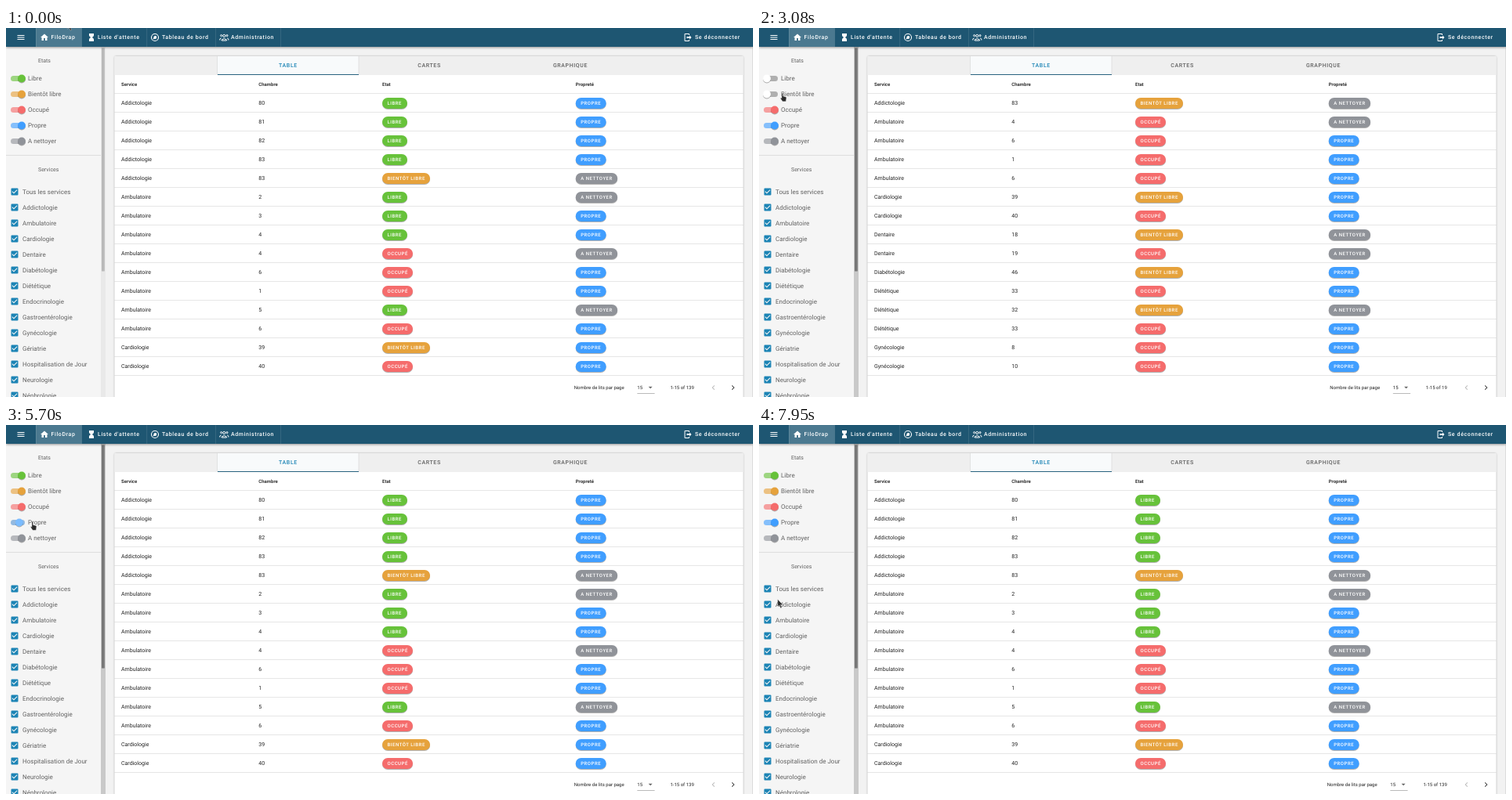
Animation of 953x471 px, one loop 8 s. Source, as an HTML page:

```html
<!DOCTYPE html>
<html lang="fr">
<head>
<meta charset="utf-8">
<title>Lits</title>
<style>
html, body { margin: 0; width: 100%; height: 100%; overflow: hidden; background: #f2f2f2; }
svg { display: block; width: 953px; height: 471px; font-family: Roboto, Arial, sans-serif; text-rendering: geometricPrecision; }
.nav, .tab { font-weight: 500; letter-spacing: .0893em; }
.pill { font-weight: 500; letter-spacing: .0893em; fill: #fff; }
.raised { filter: drop-shadow(0 1px .6px rgba(0,0,0,.3)); }
.card { filter: drop-shadow(0 .8px 1px rgba(0,0,0,.3)); }
</style>
</head>
<body>
<svg viewBox="0 0 953 471" xmlns="http://www.w3.org/2000/svg"></svg>
<script>
const LOOP = 8000;
const BAR = '#1e5672', BLUE = '#1c84b5', INK = 'rgba(0,0,0,.87)', SOFT = 'rgba(0,0,0,.6)';
const COLORS = { L: '#67c23a', B: '#e6a23c', O: '#f56c6c', P: '#409eff', N: '#909399' };
const PILLS = { L: ['LIBRE', 32], B: ['BIENTÔT LIBRE', 61], O: ['OCCUPÉ', 39], P: ['PROPRE', 39], N: ['A NETTOYER', 53.5] };

// room, state and cleanliness of each bed, by department
const BEDS = Object.entries({
  Addictologie: '80LP 81LP 82LP 83LP 83BN',
  Ambulatoire: '2LN 3LP 4LP 4ON 6OP 1OP 5LN 6OP',
  Cardiologie: '39BP 40OP',
  Dentaire: '18BN 19ON',
  Diabétologie: '43LN 46BP',
  Diététique: '33OP 32BN 33OP',
  Gynécologie: '8OP 10OP 7OP',
  Orthopédie: '20BN 22LN 22BN 23LN'
}).flatMap(([service, beds]) => beds.split(' ').map(bed =>
  ({ service, room: parseInt(bed), state: bed.at(-2), clean: bed.at(-1) })));

const SERVICES = ['Tous les services', 'Addictologie', 'Ambulatoire', 'Cardiologie', 'Dentaire', 'Diabétologie',
  'Diététique', 'Endocrinologie', 'Gastroentérologie', 'Gynécologie', 'Gériatrie', 'Hospitalisation de Jour',
  'Neurologie', 'Néphrologie'];

const WIDE = [147, 322.3, 480, 726.7], NARROW = [147, 337.3, 510.8, 704.5];
const VIEWS = [
  { at: 0, hidden: '', total: 139, cols: WIDE },
  { at: 2250, hidden: 'L', total: 19, cols: WIDE },
  { at: 3200, hidden: 'LB', total: 11, cols: NARROW },
  { at: 4280, hidden: 'L', total: 19, cols: WIDE },
  { at: 4750, hidden: '', total: 139, cols: WIDE },
  { at: 5800, hidden: 'P', total: 12, cols: WIDE },
  { at: 7150, hidden: '', total: 139, cols: WIDE }
];

const SWITCHES = [
  { key: 'L', label: 'Libre', flips: [1780, 4450] },
  { key: 'B', label: 'Bientôt libre', flips: [2850, 3780] },
  { key: 'O', label: 'Occupé', flips: [] },
  { key: 'P', label: 'Propre', flips: [5700, 6800] },
  { key: 'N', label: 'A nettoyer', flips: [] }
];

// start, end, x, y, hand shape
const MOVES = [
  [0, 0, 78, -8, false], [130, 130, 74, 2, false], [500, 700, 52, 55, false],
  [1200, 1200, 29, 64, true], [1780, 2030, 30, 76, false], [2250, 2550, 27.5, 83, true],
  [3780, 4150, 33.5, 58, true], [4750, 5150, 31.5, 123.5, true], [7630, 7950, 23.5, 222.5, false]
];

const ICONS = {
  menu: 'M3 6H21V8H3ZM3 11H21V13H3ZM3 16H21V18H3Z',
  home: 'M10 20V14H14V20H19V12H22L12 3L2 12H5V20Z',
  sand: 'M6 2V8L10 12L6 16V22H18V16L14 12L18 8V2Z',
  exit: 'M16 17V14H9V10H16V7L21 12ZM14 2A2 2 0 0 1 16 4V6H14V4H5V20H14V18H16V20A2 2 0 0 1 14 22H5A2 2 0 0 1 3 20V4A2 2 0 0 1 5 2Z',
  check: 'M10 17L5 12L6.4 10.6L10 14.2L17.6 6.6L19 8ZM19 3H5A2 2 0 0 0 3 5V19A2 2 0 0 0 5 21H19A2 2 0 0 0 21 19V5A2 2 0 0 0 19 3Z',
  next: 'M8.6 16.6L13.2 12L8.6 7.4L10 6L16 12L10 18Z',
  prev: 'M15.4 16.6L10.8 12L15.4 7.4L14 6L8 12L14 18Z'
};

const clamp = v => Math.max(0, Math.min(1, v));
const ease = v => { v = clamp(v); return v * v * (3 - 2 * v); };
const lerp = (a, b, p) => a + (b - a) * p;
const last = (list, test) => list.filter(test).at(-1);
const text = (x, y, s, size, fill = INK, extra = '') =>
  `<text x="${x}" y="${y + size * .342}" font-size="${size}" fill="${fill}" ${extra}>${s}</text>`;
const rect = (x, y, w, h, fill, extra = '') =>
  `<rect x="${x}" y="${y}" width="${w}" height="${h}" fill="${fill}" ${extra}/>`;
const icon = (name, x, y, fill, extra = '') =>
  `<path d="${ICONS[name]}" transform="translate(${x - 6} ${y - 6}) scale(.5)" fill="${fill}" ${extra}/>`;

function pill(key, x, y) {
  const [label, width] = PILLS[key];
  return rect(x, y - 7, width, 14, COLORS[key], 'rx="7" class="raised"') + text(x + 6.5, y, label, 6, '#fff', 'class="pill"');
}

function header() {
  const nav = (x, s) => text(x, 12, s, 7, '#fff', 'class="nav"');
  const person = (x, y, r) => `<circle cx="${x}" cy="${y}" r="${r}"/>`;
  return rect(0, 0, 953, 24, BAR, 'style="filter:drop-shadow(0 1px 1.5px rgba(0,0,0,.4))"')
    + rect(38, 0, 58.5, 24, '#4b7990')
    + [38, 96, 179.5, 267, 350].map(x => rect(x, 0, .6, 24, 'rgba(255,255,255,.18)')).join('')
    + icon('menu', 19, 12, '#fff') + icon('home', 49, 12, '#fff') + icon('sand', 109, 12, '#fff')
    + '<g fill="none" stroke="#fff"><circle cx="190" cy="12" r="4.5" stroke-width="1.1"/>'
    + '<path d="M188 14L191.5 10.5" stroke-width="1.2"/></g><circle cx="190.3" cy="12" r="1.9" fill="#fff"/>'
    + `<g fill="none" stroke="#fff" stroke-width="1">${person(278.3, 10, 1.6)}${person(274.6, 9.6, 1)}${person(282, 9.6, 1)}`
    + '<path d="M275.2 16V15Q278.3 12.2 281.4 15V16ZM272.8 15.5V14L274.5 12.8M283.8 15.5V14L282.1 12.8"/></g>'
    + icon('exit', 870, 12, '#fff')
    + nav(57.5, 'FiloDrap') + nav(117, 'Liste d\'attente') + nav(199, 'Tableau de bord')
    + nav(287, 'Administration') + nav(879, 'Se déconnecter');
}

function sidebar() {
  const toggles = SWITCHES.map(({ key, label }, i) => {
    const y = 64.5 + 20 * i;
    return rect(6, y - 3.5, 18, 7, '#000', `rx="3.5" id="track${key}"`)
      + `<circle cy="${y}" r="5" class="raised" id="thumb${key}"/>` + text(28, y, label, 8, SOFT);
  }).join('');
  const boxes = SERVICES.map((name, i) =>
    icon('check', 11, 209 + 20 * i, BLUE) + text(21, 209 + 20 * i, name, 8, SOFT)).join('');
  return rect(0, 24, 121, 447, '#f5f5f5') + text(41, 42, 'Etats', 7, SOFT) + toggles
    + rect(0, 162.3, 121, .7, '#d4d4d4') + text(41, 181, 'Services', 7, SOFT) + boxes
    + rect(121, 24, 6, 447, '#000', 'id="gutter"') + rect(122, 25.5, 3.8, 285, '#000', 'rx=".5" id="grip"');
}

function table({ hidden, total, cols }) {
  const rows = BEDS.filter(b => !hidden.includes(b.state) && !hidden.includes(b.clean)
    || hidden === 'L' && false).slice(0, Math.min(15, total));
  const bottom = 84 + 24 * rows.length, mid = bottom + 15, dx = total > 99 ? 0 : 3.5;
  const tab = (x, s, fill) => text(x, 48, s, 7, fill, 'class="tab" text-anchor="middle"');
  const head = ['Service', 'Chambre', 'Etat', 'Propreté'].map((s, i) =>
    text(cols[i], 72, s, 6, 'rgba(0,0,0,.8)', 'font-weight="700"')).join('');
  const line = y => rect(138.5, y - .7, 802, .7, 'rgba(0,0,0,.14)');
  const body = rows.map((b, i) => {
    const y = 95.8 + 24 * i;
    return text(cols[0], y, b.service, 7) + text(cols[1], y, b.room, 7)
      + pill(b.state, cols[2], y + .2) + pill(b.clean, cols[3], y + .2) + line(y + 12.2);
  }).join('');
  return rect(138.5, 36, 802, bottom - 6.5, '#fff', 'rx="2" class="card"')
    + rect(138.5, 36, 802, 24, '#efefef') + rect(269.5, 36, 180.5, 24, '#f8fafb')
    + rect(269.3, 36, .6, 24, '#d5d5d5') + rect(449.7, 36, .6, 24, '#d5d5d5')
    + rect(270, 59, 180, 1, '#28627f')
    + tab(360, 'TABLE', BLUE) + tab(540, 'CARTES', SOFT) + tab(720, 'GRAPHIQUE', SOFT)
    + head + line(84) + body
    + text(724.8 + dx, mid, 'Nombre de lits par page', 6) + text(805.3 + dx, mid, '15', 6)
    + `<path d="M${819.6 + dx} ${mid - 1.2}h5l-2.5 2.5z" fill="${SOFT}"/>`
    + rect(805.3 + dx, mid + 7.2, 22.3, .6, 'rgba(0,0,0,.45)')
    + text(877.8, mid, `1-${rows.length} of ${total}`, 6, INK, 'text-anchor="end"')
    + icon('prev', 902.5, mid, '#000', 'opacity=".27"') + icon('next', 927.5, mid, '#000', 'id="next"')
    + (rows.length < 15 ? rect(127, 460.5, 826, 10.5, BAR) : '');
}

const svg = document.querySelector('svg');
svg.innerHTML = rect(0, 0, 953, 471, '#f2f2f2') + '<g id="table"></g>' + rect(952, 24, 1, 447, '#dcdcdc')
  + sidebar() + header()
  + '<g id="cursor" fill="#2b2b2b" stroke="#fff" stroke-opacity=".6" stroke-width=".5">'
  + '<path id="arrow" d="M.3 0V9.3L2.4 7.5L4 11.2L5.6 10.5L4 6.9H6.9Z"/>'
  + '<path id="hand" d="M1.5 .8C1.5 -.2 3 -.2 3 .8V4L6.6 4.9C7.3 5.1 7.5 5.6 7.4 6.3L6.8 10.8H2.6L.3 7.4C-.3 6.4 .6 5.8 1.1 6.3L1.5 6.8Z"/></g>';
const get = id => document.getElementById(id);
const set = (id, attrs) => { for (const k in attrs) get(id).setAttribute(k, attrs[k]); };

const rgb = hex => [1, 3, 5].map(i => parseInt(hex.slice(i, i + 2), 16));
const mix = (a, b, p) => `rgb(${rgb(a).map((v, i) => Math.round(lerp(v, rgb(b)[i], p)))})`;

let shown;
function drawTable(t) {
  const view = last(VIEWS, v => t >= v.at);
  if (view !== shown) get('table').innerHTML = table(shown = view);
  const before = VIEWS[VIEWS.indexOf(view) - 1] || view;
  const strength = v => v.total > 15 ? .75 : .27;
  set('next', { opacity: lerp(strength(before), strength(view), ease((t - view.at) / 290)) });
}

function drawSwitch({ key, flips }, t) {
  const flip = last(flips, at => t >= at);
  const p = flip === undefined ? 1 : ease((t - flip + 80) / 220);
  const on = flip === flips[0] && flip !== undefined ? 1 - p : p;
  set('thumb' + key, { cx: lerp(10, 20, on), fill: mix('#ffffff', COLORS[key], on) });
  set('track' + key, { fill: mix('#696969', COLORS[key], on), 'fill-opacity': lerp(.5, .62, on) });
}

function drawCursor(t) {
  const i = MOVES.filter(m => t >= m[0]).length - 1;
  const [start, end, x, y, hand] = MOVES[i];
  const from = MOVES[Math.max(0, i - 1)];
  const p = end > start ? ease((t - start) / (end - start)) : 1;
  set('cursor', { transform: `translate(${lerp(from[2], x, p)} ${lerp(from[3], y, p)})` });
  set('arrow', { visibility: hand ? 'hidden' : 'visible' });
  set('hand', { visibility: hand ? 'visible' : 'hidden' });
}

function render(t) {
  drawTable(t);
  SWITCHES.forEach(s => drawSwitch(s, t));
  const hover = t < 1780 ? 0 : ease((t - 1700) / 300);
  set('gutter', { fill: mix('#e9e9e9', '#c9c9c9', hover) });
  set('grip', { fill: mix('#b9b9b9', '#777777', hover) });
  drawCursor(t);
}

const began = performance.now();
function tick() {
  render((performance.now() - began) % LOOP);
  requestAnimationFrame(tick);
}
tick();
</script>
</body>
</html>
```
